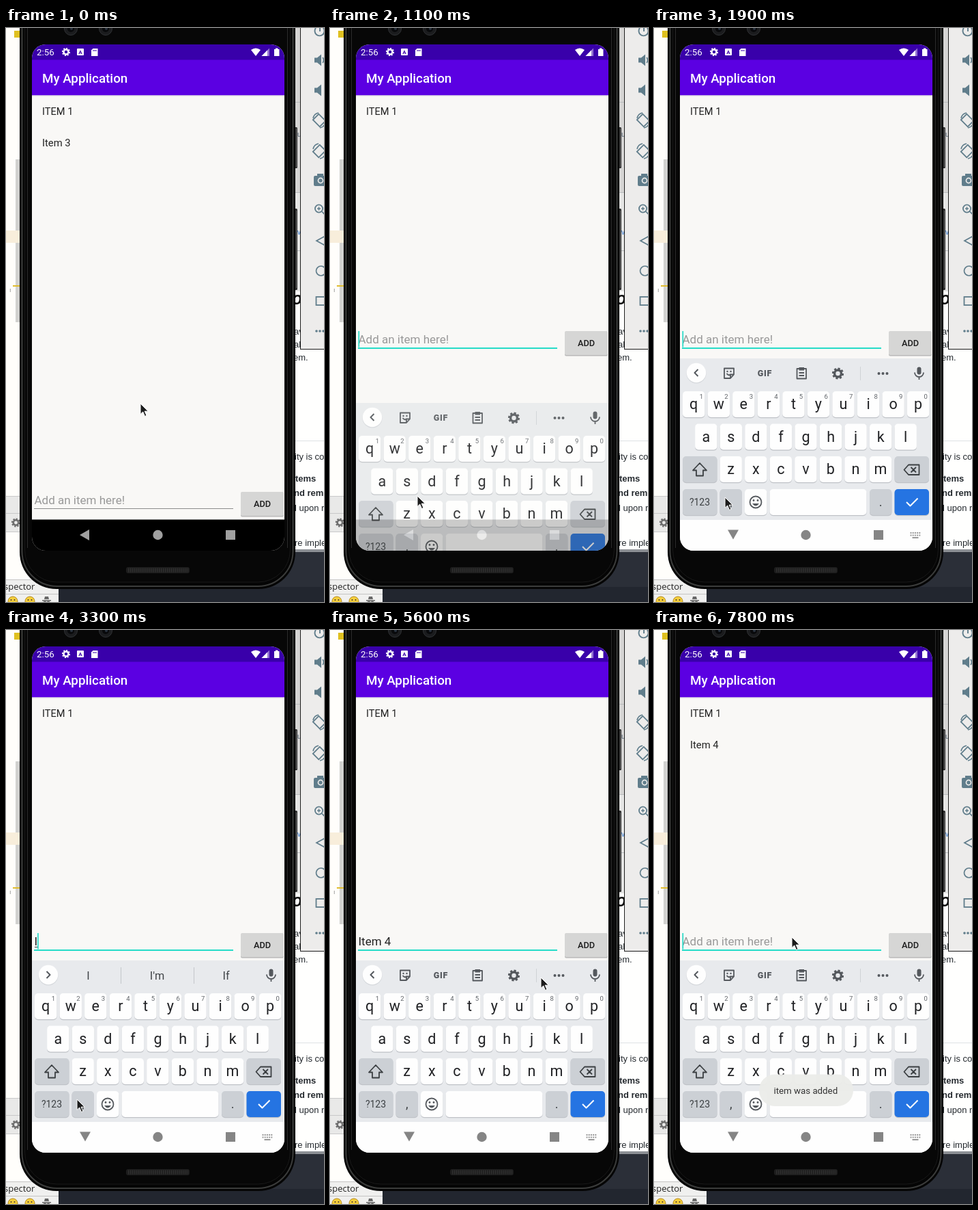
An HTML page for the animation above (8000 ms loop, 466 by 839 pixels).

```html
<!DOCTYPE html>
<html lang="en">
<head>
<meta charset="utf-8">
<title>Item list</title>
<style>
html, body { margin: 0; width: 100%; height: 100%; overflow: hidden; background: #fff; }
svg { display: block; width: 466px; height: 839px; font-family: Roboto, sans-serif; }
text { white-space: pre; }
.desk { font-family: "Liberation Sans", Arial, sans-serif; }
.caps .letter { text-transform: uppercase; }
.mid { text-anchor: middle; }
</style>
</head>
<body>
<svg id="stage" viewBox="0 0 466 839" xmlns="http://www.w3.org/2000/svg"></svg>
<script>
const rect = (x, y, w, h, fill, extra = '') =>
  `<rect x="${x}" y="${y}" width="${w}" height="${h}" fill="${fill}" ${extra}/>`;
const circle = (x, y, r, fill, extra = '') =>
  `<circle cx="${x}" cy="${y}" r="${r}" fill="${fill}" ${extra}/>`;
const path = (d, fill, extra = '') => `<path d="${d}" fill="${fill}" ${extra}/>`;
const line = (d, color, width, extra = '') =>
  path(d, 'none', `stroke="${color}" stroke-width="${width}" ${extra}`);
const text = (x, y, s, size, fill, extra = '') =>
  `<text x="${x}" y="${y}" font-size="${size}" fill="${fill}" ${extra}>${s}</text>`;
const group = (id, body, extra = '') => `<g id="${id}" ${extra}>${body}</g>`;
const dots = (x, y, gap, r, fill) => [-gap, 0, gap].map(d => circle(x + d, y, r, fill)).join('');
const gear = (x, y, r, color) =>
  circle(x, y, r * .58, 'none', `stroke="${color}" stroke-width="${r * .4}"`) +
  circle(x, y, r * .85, 'none', `stroke="${color}" stroke-width="${r * .32}" pathLength="16" stroke-dasharray="1.1 .9"`);

function desktop() {
  const face = x => circle(x, 838, 7, '#f5cf3c', 'stroke="#b58a20"') +
    circle(x - 2.5, 836, 1, '#433') + circle(x + 2.5, 836, 1, '#433');
  const left = rect(0, 0, 30, 839, '#fffefb') + rect(12, 4, 10, 10, '#dfc020') +
    rect(14, 192, 10, 238, '#d2d2d0') + rect(0, 296, 24, 18, '#f8eedb') +
    rect(10, 376, 14, 2, '#e0bd30') + text(5, 386, 'ı', 9, '#888') +
    rect(0, 685, 40, 52, '#e9e9e8') + line('M0 684.5H40M0 709.5H40M0 736.5H40', '#c9c9c9', 1) +
    gear(14.5, 723, 6.5, '#6d6d6d') +
    rect(77, 764, 389, 75, '#2b2f38') + rect(77, 817, 389, 22, '#22262f') +
    rect(0, 806, 77, 33, '#f0f0ef') + line('M0 806.5H77M0 827.5H77', '#c4c4c4', 1) +
    text(-3, 821, 'spector', 13, '#222', 'style="font-family:\'Open Sans\',sans-serif"') +
    face(10) + face(35) + path('M53 836h13v1.6h-13zM56 835l1-4h5l1 4z', '#666') +
    circle(57, 840, 2.4, '#666') + circle(62, 840, 2.4, '#666');
  const copy = [
    [422, 448, 'av'], [422, 467, 'al'], [421, 486, 'em.'], [423, 631, 'ity is co'],
    [424, 663, 'tems', 1], [422, 684, 'nd rem', 1], [423, 706, 'l upon r'], [423, 757, 're imple']
  ].map(([x, y, s, bold]) => text(x, y, s, 13, '#24292e', bold ? 'font-weight="700"' : '')).join('');
  const right = rect(415, 0, 51, 764, '#fffffe') + rect(420, 0, 12, 240, '#d6d5d4') +
    rect(420, 240, 12, 145, '#e6e6e5') + line('M420 108.5h12M420 240.5h12M420 325.5h12', '#b8babd', 1) +
    text(427, 159, 'u', 10, '#456') + text(427, 302, 'v', 10, '#37c') +
    text(419, 404, 'o', 25, '#111', 'font-weight="700" font-style="italic"') +
    line('M420 603.5H466', '#dfe2e5', 1) + rect(420, 762, 46, 4, '#8d9095') + copy;
  return group('desktop', left + right, 'class="desk"');
}

function toolbar() {
  const c = '#607d8b';
  const speaker = y => path(`M452 ${y - 3.5}h4l6-5v17l-6-5h-4z`, c);
  const turn = (y, a) => rect(453, y - 7, 12, 14, 'none', `stroke="${c}" stroke-width="1.8" transform="rotate(${a} 459 ${y})"`) +
    line(`M450 ${y - 3}a10 10 0 0 1 8-8M468 ${y + 3}a10 10 0 0 1-8 8`, c, 1.5);
  return rect(431, -2, 40, 472, '#1e1e1e') + rect(432, -2, 40, 471, '#edeceb') +
    line('M454 0a7 7 0 1 0 11 0M460-4V5', c, 1.9) +
    speaker(47) + line('M464 43q3 4 0 8', c, 1.6) + speaker(91) +
    turn(135, -45) + turn(180, 45) +
    rect(451, 216, 18, 15, c, 'rx="2"') + rect(456, 213, 9, 5, c) +
    circle(461, 223, 4.4, '#edeceb') + circle(461, 223, 2.7, c) +
    circle(458.5, 264, 5.6, 'none', `stroke="${c}" stroke-width="1.8"`) +
    line('M462.5 268l6 6M456 264h5M458.5 261.5v5', c, 1.6) +
    line('M467 304.500L455 311L467 317.500Z', c, 1.7) +
    circle(461.500, 355, 7, 'none', `stroke="${c}" stroke-width="1.7"`) +
    rect(454.5, 393, 14, 12, 'none', `stroke="${c}" stroke-width="1.8"`) + dots(460, 443, 5, 1.8, c);
}

function phone() {
  const lens = x => circle(x, 1, 9.5, '#1b1c1e', 'stroke="#303235"') + circle(x, 1, 5, '#08090b') + circle(x + 1, 1, 2, '#29323e');
  return rect(421, 145, 6, 60, '#303030', 'rx="1.5"') + rect(421, 264, 6, 119, '#303030', 'rx="1.5"') +
    line('M425.500 147v56M425.500 267v113', '#666', 1) +
    rect(20, -80, 404, 900, '#050505', 'rx="54"') +
    rect(23.5, -80, 397, 896, 'none', 'rx="51" stroke="#3b3c3b" stroke-width="2"') +
    rect(27.5, -80, 389, 890, '#070707', 'rx="47" stroke="#191919"') +
    line('M31.5 0V760M412.5 0V760', '#2c2c2c', 1) + lens(95) + lens(146) +
    rect(176, 788, 93, 9, '#1d1d1d', 'rx="3"') +
    line('M179 792.5H267', '#303030', 6, 'stroke-dasharray="1.500 1.500"');
}

function appBars() {
  return rect(38, 24, 370, 740, '#f9f8f6') + rect(38, 24, 370, 23, '#3900aa') + rect(38, 46.500, 370, 52, '#5b00e2') +
    rect(38, 98.5, 370, 1, '#d9d5df') +
    text(45, 40, '2:56', 13.3, '#fff') + gear(88, 35, 6, '#fff') +
    rect(104, 30, 10, 10, '#fff', 'rx="1"') + text(109, 38.2, 'A', 8, '#3900aa', 'class="mid" font-weight="700"') +
    path('M127.500 30H134.500V41H125V32.500Z', '#fff') + line('M128 32v2M130 32v2M132 32v2', '#3900aa', 1) +
    path('M359 32Q366 27 373 32L366 41Z', '#fff') + path('M374.500 41H386V29.500Z', '#fff', 'opacity=".45"') +
    path('M374.500 41H383V32.500Z', '#fff') +
    path('M393 31h2v-1.500h3.500v1.500h2V41h-7.500z', '#fff') +
    text(53, 80, 'My Application', 18.8, '#fff', 'font-weight="500"') +
    text(53, 127, 'ITEM 1', 14.6, '#222') + text(53, 173, '', 14.8, '#222', 'id="second"');
}

function inputRow() {
  const button = rect(344, 444, 63, 35.500, '#b9b9b9', 'rx="2"') + rect(344, 443, 63, 35, '#d6d6d5', 'rx="2"') +
    `<g clip-path="url(#buttonClip)">${circle(370, 447, 38, '#000', 'id="ripple" opacity="0"')}</g>` +
    text(375.5, 465.2, 'ADD', 12.8, '#1d1d1d', 'class="mid" font-weight="500"');
  return group('row', text(41.5, 461, '', 17, '#999', 'id="field"') +
    rect(42, 463, 0, 1, '#444', 'id="compose"') + rect(41, 467, 292, 1, '#8c8c8c', 'id="rule"') +
    rect(41.5, 443, 1.6, 23.5, '#18d8c4', 'id="caret"') + button);
}

function keyboard() {
  const ink = '#202124', soft = '#54585d', step = 36.55;
  const key = (x, y, w, fill) => rect(x, y + 1, w, 38.300, '#bfc2c7', 'rx="5"') + rect(x, y, w, 38, fill, 'rx="5"');
  const letters = (row, x0, y) => [...row].map((ch, i) => {
    const x = x0 + i * step;
    return key(x - 16.2, y, 32.400, '#fefefe') + text(x, y + 26, ch, 21.5, ink, 'class="mid letter"');
  }).join('');
  const digits = [...'1234567890'].map((d, i) => text(69.3 + i * step, 541.5, d, 9.5, '#5f6368', 'class="mid"')).join('');
  const stroke = (d, w = 1.8, c = soft) => line(d, c, w, 'stroke-linejoin="round"');
  const tools = group('tools',
    stroke('M103 497.500h14v9l-5 5.500h-9zM117 506.500h-5v5.500M106.500 505q3 4 6 1') +
    circle(107.500, 502, 1.2, soft) + circle(112.500, 502, 1.2, soft) +
    text(162.5, 508.7, 'GIF', 12.500, soft, 'class="mid" font-weight="900" letter-spacing=".8"') +
    stroke('M209.500 498h13.500v14.500h-13.500zM212.500 504h7.500M212.500 508h7.500') + rect(212.500, 496, 7.500, 4.500, soft) +
    gear(269.500, 505, 8.500, soft) + line('M302.500 495V515', '#cfd2d6', 1) + dots(335.5, 505, 6, 2, soft) +
    stroke('M64.500 499l-5 5 5 5', 2));
  const hints = group('hints',
    [120.5, 221.5, 322.5].map(x => text(x, 511, '', 16.3, '#3f4347', 'class="mid word"')).join('') +
    line('M168.500 493V517M275.500 493V517', '#c3c6ca', 1) + stroke('M59.500 499l5 5-5 5', 2));
  const mic = rect(385.500, 495.500, 6, 11, soft, 'rx="3"') + stroke('M382 503.500a6.500 6.500 0 0 0 13 0M388.500 510v4');
  const special = key(42, 626, 50.500, '#ccd0d5') + key(352.500, 626, 50.500, '#ccd0d5') +
    stroke('M67 636l10 10.500h-5v8h-10v-8h-5z', 1.8, '#3c4043') +
    stroke('M373 638.500h15.500v14.500h-15.500l-6.500-7.250zM376.500 642l7.500 7.500M384 642l-7.500 7.500', 1.8, '#3c4043') +
    key(42, 674, 50.500, '#ccd0d5') + text(67, 698, '?123', 14, '#3c4043', 'class="mid"') +
    key(96.500, 674, 32.400, '#ccd0d5') + text(112.700, 699, ',', 18, '#3c4043', 'class="mid"') +
    key(133, 674, 32.400, '#fefefe') + circle(149, 693, 8.500, 'none', `stroke="${soft}" stroke-width="1.8"`) +
    circle(146, 690.500, 1.4, soft) + circle(152, 690.500, 1.4, soft) + path('M144 695h10q-5 7-10 0z', soft) +
    key(169.500, 674, 142, '#fefefe') + key(316, 674, 32.400, '#ccd0d5') + text(332, 699, '.', 18, '#3c4043', 'class="mid"') +
    key(352.500, 674, 50.500, '#2574e2') + stroke('M370 693l5.500 5.500 11-11', 2, '#fff');
  const nav = rect(38, 719, 370, 46, '#fefefe') + path('M108 733.500h16l-8 14z', '#858585') +
    circle(222.500, 741, 7.2, '#858585') + rect(322, 734, 14, 14, '#858585') +
    line('M375.500 738h15M375.500 741.500h15', '#999', 2, 'stroke-dasharray="2 1.200"') + line('M378.500 745h9', '#999', 1.8);
  return group('keyboard', rect(38, 483, 370, 237, '#e8eaed') +
    circle(62, 505, 14.5, '#d5d8dc') + circle(62, 504, 14.2, '#fefefe') + tools + hints + mic +
    letters('qwertyuiop', 58.2, 531) + digits + letters('asdfghjkl', 76.3, 578.500) +
    letters('zxcvbnm', 112.7, 626) + special + nav);
}

const darkNav = group('darkNav', rect(38, 718.500, 370, 46, '#000') + path('M108 741l14-8v16z', '#a0a0a0') +
  circle(222.500, 741, 7.2, '#a0a0a0') + rect(322, 734, 14, 14, '#a0a0a0'));
const toast = group('toast', rect(154, 649.500, 138, 46.500, '#ebece9', 'rx="23" opacity=".95"') +
  text(222.3, 678, 'item was added', 13.3, '#333', 'class="mid"'));
const pointer = group('pointer',
  path('M0 0V15.500L3.700 12L6.500 18.500L9 17.400L6.200 11.200H11.300Z', '#1c1c1c', 'stroke="#fff" stroke-width="1"'));

document.getElementById('stage').innerHTML =
  `<defs><clipPath id="screenClip">${rect(38, 24, 370, 740, '#000', 'rx="20"')}</clipPath>
   <clipPath id="buttonClip">${rect(344, 443, 63, 35, '#000', 'rx="2"')}</clipPath></defs>` +
  desktop() + phone() + toolbar() +
  `<g clip-path="url(#screenClip)">${appBars() + inputRow() + keyboard() + darkNav + toast}</g>` + pointer;

const $ = id => document.getElementById(id);
const set = (id, attrs) => { for (const k in attrs) $(id).setAttribute(k, attrs[k]); };
const words = document.querySelectorAll('.word');

// Tracks: [time, ...values]
const moves = [[0, 197, 549], [100, 190, 565], [400, 149, 652], [600, 145, 664], [900, 128, 684], [1100, 128, 684],
  [1400, 104, 688], [1700, 103, 687], [1800, 104, 686], [5500, 104, 686], [5600, 309, 508], [5900, 338, 545],
  [6100, 345, 530], [6400, 374, 447], [6900, 374, 447], [7400, 319, 453], [7500, 202, 449], [8000, 202, 449]];
const slide = [[0, 281, 0, 1], [900, 281, 0, 1], [1000, 165, .4, .75], [1100, 65, .9, .2], [1200, 22, 1, 0],
  [1300, 5, 1, 0], [1400, 0, 1, 0], [8000, 0, 1, 0]];
const press = [[0, 0, 0], [6400, 0, 0], [6500, 22, .12], [6600, 38, .14], [6700, 55, .14], [6900, 70, 0], [8000, 70, 0]];
const toastFade = [[0, 0], [6800, 0], [7100, 1], [8000, 1]];
const typed = [[0, ''], [3300, 'I'], [3500, 'It'], [3600, 'Ite'], [4300, 'Item'], [4700, 'Item '], [4800, 'Item 4'], [6700, '']];
const guesses = [[3300, "I,I'm,If"], [3500, "It,It's,Its"], [3600, 'Ite,Item,Items'], [4000, 'Ite,Items,Item'],
  [4300, "Item,Items,Item's"], [4700, '4,is,number']];
const blinks = [[900, 1400], [1900, 2400], [2900, 5300], [5800, 6300], [6700, 7200], [7700, 8000]];

function mix(track, t) {
  const i = track.findIndex(k => k[0] > t), a = track[i - 1], b = track[i];
  const p = (t - a[0]) / (b[0] - a[0]);
  return a.slice(1).map((v, n) => v + (b[n + 1] - v) * p);
}
const held = (track, t) => track.reduce((v, k) => k[0] <= t ? k[1] : v, '');
const within = (t, a, b) => t >= a && t < b;

function draw(t) {
  const [x, y] = mix(moves, t), [drop, shown, dark] = mix(slide, t), [r, tint] = mix(press, t);
  const value = held(typed, t), focused = t >= 900;
  set('pointer', { transform: `translate(${x} ${y})` });
  set('keyboard', { transform: `translate(0 ${drop})`, opacity: shown });
  set('darkNav', { opacity: dark });
  set('ripple', { r, opacity: tint });
  set('toast', { opacity: mix(toastFade, t)[0] });
  set('row', { transform: `translate(0 ${t < 1000 ? 235 : 0})` });
  set('rule', { fill: focused ? '#26dcc8' : '#8c8c8c', height: focused ? 2 : 1 });
  $('second').textContent = t < 900 ? 'Item 3' : t >= 6800 ? 'Item 4' : '';

  $('field').textContent = value || 'Add an item here!';
  set('field', { fill: value ? '#222' : '#999' });
  const width = value ? $('field').getComputedTextLength() : 0;
  set('caret', { x: 41.5 + width, opacity: blinks.some(([a, b]) => within(t, a, b)) ? 1 : 0 });
  set('compose', { width: within(t, 3300, 4700) ? width : 0 });

  const guessing = within(t, 3300, 5100);
  set('tools', { visibility: guessing ? 'hidden' : 'visible' });
  set('hints', { visibility: guessing ? 'visible' : 'hidden' });
  held(guesses, t).split(',').forEach((s, i) => { words[i].textContent = s; });
  $('keyboard').classList.toggle('caps', within(t, 3100, 3300));
}

const start = performance.now();
function frame() {
  // The screen updates ten times a second.
  draw(Math.floor(((performance.now() - start) % 8000) / 100) * 100);
  requestAnimationFrame(frame);
}
frame();
</script>
</body>
</html>
```
